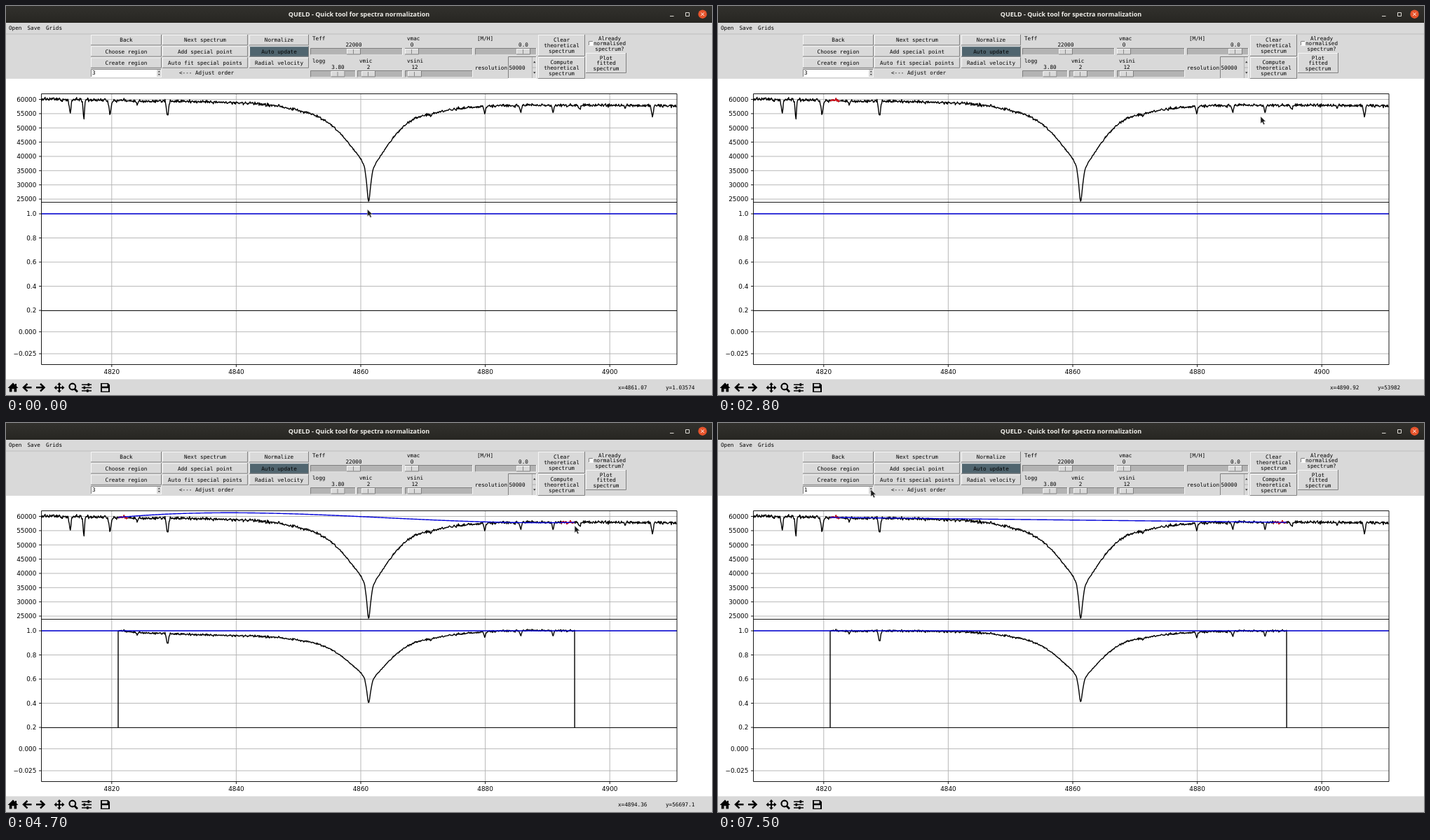
An HTML page for the animation above (8 s loop, 1007 by 556 pixels).

```html
<!DOCTYPE html>
<html lang="en">
<head>
<meta charset="utf-8">
<title>Spectra normalization</title>
<style>
html, body { margin: 0; width: 100%; height: 100%; overflow: hidden; background: #fff; }
svg { display: block; width: 1007px; height: 556px; }
text { white-space: pre; }
.ui { font: 7.65px "DejaVu Sans Mono", monospace; fill: #000; }
.tick { font: 8.85px "DejaVu Sans", sans-serif; fill: #000; }
.title { font: bold 9px "Open Sans", sans-serif; fill: #f0efea; }
.line { fill: none; stroke-width: 1.4; stroke-linejoin: round; }
</style>
</head>
<body>
<svg id="stage" viewBox="0 0 1007 556">
  <defs>
    <linearGradient id="bar" x2="0" y2="1">
      <stop stop-color="#32312d"/><stop offset="1" stop-color="#272622"/>
    </linearGradient>
    <clipPath id="topClip"><path d="M50.5 125.5H957V280.5H50.5Z"/></clipPath>
    <clipPath id="midClip"><path d="M50.5 280.5H957V435.5H50.5Z"/></clipPath>
  </defs>
  <rect width="1007" height="556" fill="#fff"/>
  <g id="window"></g>
  <g id="grid"></g>
  <g id="plots"></g>
  <g id="frame"></g>
  <g id="icons" fill="#000" stroke="none">
    <path d="M10 538.5L2.5 546H4.8V551.5H8.5V547.3H11.5V551.5H15.2V546H17.5L15 543.5V540H13V541.5Z"/>
    <path d="M36.5 545.3H25.5M30.5 540L25 545.3L30.5 550.6M43 545.3H54M49 540L54.5 545.3L49 550.6" fill="none" stroke="#000" stroke-width="2.5"/>
    <path d="M76 538L79 541.4H77V544.4H80V542.3L83.5 545.4L80 548.5V546.4H77V549.4H79L76 552.8L73 549.4H75V546.4H72V548.5L68.5 545.4L72 542.3V544.4H75V541.4H73Z"/>
    <path d="M98 547.5L102 551.5" stroke="#000" stroke-width="2.8"/>
    <circle cx="94.8" cy="544" r="4.4" fill="none" stroke="#000" stroke-width="2.1"/>
    <path d="M108 541.2H122M108 545.6H122M108 550H122" stroke="#000" stroke-width="1.5"/>
    <path d="M116.5 539.2h2.6v4h-2.6zM110.5 543.6h2.6v4h-2.6zM115 548h2.6v4h-2.6z"/>
    <path d="M135 539H145.5L148 541.5V552H135ZM137 540.3V543.8H144.5V540.3ZM137 546.3V550.8H146V546.3Z" fill-rule="evenodd"/>
  </g>
  <path id="cursor" d="M0 0V9.8L2.3 7.7L4.1 11.5L5.8 10.7L4.1 7H7.2Z" fill="#1c1c1c" stroke="#d0d0d0" stroke-width=".5"/>
</svg>
<script>
const LOOP = 8000, LEFT = 50.5, RIGHT = 957;
const $ = id => document.getElementById(id);

function el(parent, tag, attrs, text) {
  const node = document.createElementNS('http://www.w3.org/2000/svg', tag);
  for (const key in attrs) node.setAttribute(key, attrs[key]);
  if (text !== undefined) node.textContent = text;
  parent.appendChild(node);
  return node;
}
const rect = (p, x, y, w, h, fill) => el(p, 'rect', { x, y, width: w, height: h, fill });
const path = (p, d, attrs) => el(p, 'path', { d, fill: 'none', ...attrs });
const label = (p, x, y, text, anchor = 'start', cls = 'ui', dy = 2.7) =>
  el(p, 'text', { x, y: y + dy, 'text-anchor': anchor, class: cls }, text);

// Data to pixels and back
const waveX = w => 506 + (w - 4860) * 8.88;
const fluxY = f => 133.5 + (60000 - f) * 20.36 / 5000;
const normY = n => 297 + (1 - n) * 172.6;
const xWave = x => 4860 + (x - 506) / 8.88;
const yFlux = y => 60000 - (y - 133.5) * 5000 / 20.36;
const yNorm = y => 1 - (y - 297) / 172.6;
const yRest = y => (465.7 - y) * .025 / 31.3;

// ---- window chrome ----
const ui = $('window');
rect(ui, 0, 0, 1007, 24, 'url(#bar)');
label(ui, 503.5, 12, 'QUELD - Quick tool for spectra normalization', 'middle', 'title', 3.2);
path(ui, 'M947 14.5H952.5M969.5 9.5H974.5V14.5H969.5Z', { stroke: '#dedcd6' });
el(ui, 'circle', { cx: 993.5, cy: 11.7, r: 6.2, fill: '#e7542c' });
path(ui, 'M991.3 9.5L995.7 13.9M995.7 9.5L991.3 13.9', { stroke: '#fff' });
rect(ui, 0, 24, 1007, 80, '#d9d9d9');
rect(ui, 0, 39.5, 1007, 1, '#bdbdbd');
rect(ui, 0, 533.5, 1007, 22.5, '#d9d9d9');
label(ui, 4, 31.5, 'Open');
label(ui, 30.5, 31.5, 'Save');
label(ui, 57, 31.5, 'Grids');

function bevel(x, y, w, h, fill, raised = true) {
  rect(ui, x, y, w, h, fill);
  const [a, b] = raised ? ['#f6f6f6', '#808080'] : ['#808080', '#f6f6f6'];
  path(ui, `M${x + .5} ${y + h}V${y + .5}H${x + w}`, { stroke: a });
  path(ui, `M${x} ${y + h - .5}H${x + w - .5}V${y}`, { stroke: b });
}
function button(x, y, w, h, text, fill = '#d9d9d9', gap = 8) {
  bevel(x, y, w, h, fill);
  const lines = text.split('|');
  lines.forEach((s, i) =>
    label(ui, x + w / 2, y + h / 2 + (i - (lines.length - 1) / 2) * gap, s, 'middle'));
}
[[121, 101, 'Back', 'Choose region', 'Create region'],
 [223, 122, 'Next spectrum', 'Add special point', 'Auto fit special points'],
 [347, 85, 'Normalize', 'Auto update', 'Radial velocity']].forEach(([x, w, ...names]) =>
  names.forEach((s, i) =>
    button(x, 41 + i * 16.2, w, 15.4, s, s === 'Auto update' ? '#50656f' : '#d9d9d9')));
button(759, 41, 67, 31, 'Clear|theoretical|spectrum');
button(759, 73, 67, 31, 'Compute|theoretical|spectrum');
button(827, 67, 58, 29, 'Plot|fitted|spectrum', '#d9d9d9', 7.3);
['Already', 'normalised', 'spectrum?'].forEach((s, i) => label(ui, 861, 46 + i * 7.4, s, 'middle'));
bevel(831, 50, 7, 7, '#fff', false);

const arrows = (x, up, down, s) => path(ui,
  `M${x - s} ${up + s}h${2 * s}l${-s} ${-1.4 * s}ZM${x - s} ${down - s}h${2 * s}l${-s} ${1.4 * s}Z`, { fill: '#333' });
bevel(121, 90, 101, 12, '#fff', false);
rect(ui, 215, 91, 6, 10, '#d9d9d9');
arrows(218.3, 93, 98.5, 1.4);
const order = label(ui, 123, 95.3, '3');
label(ui, 247, 95, '<--- Adjust order');

function slider(name, nameX, value, x, y, w, knob) {
  label(ui, nameX, y - 14, name);
  label(ui, knob, y - 5, value, 'middle');
  bevel(x, y, w, 10.5, '#b3b3b3', false);
  bevel(knob - 10, y + 1, 20, 8.5, '#d9d9d9');
  path(ui, `M${knob - .5} ${y + 2}v6.5`, { stroke: '#888' });
}
slider('Teff', 437, '22000', 434, 60, 132, 496);
slider('vmac', 572, '0', 569, 60, 97, 579);
slider('[M/H]', 672, '0.0', 669, 60, 88, 738);
slider('logg', 437, '3.80', 434, 92, 65, 473.5);
slider('vmic', 504, '2', 501, 92, 65, 517);
slider('vsini', 572, '12', 569, 92, 97, 583);
label(ui, 669, 88, 'resolution');
bevel(716, 72, 41, 32, '#d9d9d9', false);
label(ui, 717.5, 88, '50000');
path(ui, 'M750.5 73V103M750.5 88H756', { stroke: '#b0b0b0' });
arrows(753.8, 79.5, 96, 1.7);

// ---- axes ----
const grid = $('grid'), frame = $('frame');
let gridD = '', tickD = '';
for (let w = 4820; w <= 4900; w += 20) {
  const x = waveX(w);
  gridD += `M${x} 125.5V512.5`;
  tickD += `M${x} 512.5v3.5`;
  label(frame, x, 523, w, 'middle', 'tick', 3.2);
}
function yTick(y, text) {
  gridD += `M${LEFT} ${y}H${RIGHT}`;
  tickD += `M${LEFT} ${y}h-3.5`;
  label(frame, 43.3, y, text, 'end', 'tick', 3.3);
}
for (let f = 25000; f <= 60000; f += 5000) yTick(fluxY(f), f);
for (let i = 1; i <= 5; i++) yTick(normY(i / 5), (i / 5).toFixed(1));
yTick(465.7, '0.000');
yTick(497, '\u22120.025');
path(grid, gridD, { stroke: '#b0b0b0', 'stroke-width': .9 });
path(frame, tickD + `M${LEFT} 125.5H${RIGHT}V512.5H${LEFT}ZM${LEFT} 280.5H${RIGHT}M${LEFT} 435.5H${RIGHT}`,
  { stroke: '#000', 'stroke-width': .9 });

// ---- spectrum ----
const shape = [[50, 133.2], [160, 135], [230, 136], [290, 137.2], [340, 139], [380, 142], [405, 146.5],
  [425, 151], [443, 157.5], [460, 167], [475, 180], [490, 198], [504, 216], [511, 229], [514, 250],
  [517.3, 279.5], [520, 258], [523, 236], [528, 224], [540, 206], [552, 189], [565, 174], [580, 163],
  [600, 155], [625, 150], [655, 145.5], [690, 143], [750, 142], [860, 142], [960, 143]];
const dips = [[91.5, 17, 1.3], [111, 27, 1], [148.5, 20, 1.5], [187, 6, 1], [230.5, 21, 1.4], [606, 4, 1.5],
  [683, 12, 1], [734, 10, 1], [780.5, 10, 1.1], [818, 6, 1.2], [883, 5, 1], [922, 16, 1.2]];

// Monotone cubic through the shape points
const secant = shape.slice(1).map((p, i) => (p[1] - shape[i][1]) / (p[0] - shape[i][0]));
const slope = shape.map((_, i) => {
  const a = secant[i - 1], b = secant[i];
  if (a === undefined || b === undefined) return a ?? b;
  return a * b <= 0 ? 0 : 2 * a * b / (a + b);
});
function smooth(x) {
  let i = 0;
  while (i < shape.length - 2 && x > shape[i + 1][0]) i++;
  const [x0, y0] = shape[i], [x1, y1] = shape[i + 1], h = x1 - x0, u = (x - x0) / h, v = 1 - u;
  return y0 * v * v * (1 + 2 * u) + y1 * u * u * (3 - 2 * u) + h * u * v * (slope[i] * v - slope[i + 1] * u);
}
let seed = 4861;
const random = () => (seed = seed * 16807 % 2147483647) / 2147483647;
const noise = () => random() + random() + random() + random() - 2;

const points = [];
for (let x = LEFT; x <= RIGHT; x += .75) {
  let y = smooth(x);
  const level = yFlux(y) / 60000;
  for (const [c, d, s] of dips) y += d * Math.exp(-((x - c) ** 2) / (2 * s * s));
  points.push([x, y + noise() * 2 * level * level * (x < 160 ? 1.15 : 1)]);
}
const trace = list => list.map(([x, y], i) => (i ? 'L' : 'M') + x.toFixed(2) + ' ' + y.toFixed(2)).join('');
const between = (a, b) => points.filter(([x]) => x >= a && x <= b);

// ---- regions and fits ----
const regions = [
  { from: 160, to: waveX(4822.57), press: 1100, release: 2200 },
  { from: 792, to: waveX(4894.36), press: 3400, release: 4700 }
];
const start = regions[0].from, end = regions[1].to;
const bend = { 1: () => 0, 2: () => -6, 3: u => 89.6 * u - 67.5 };
function fitY(n, x) {
  const u = (x - start) / (end - start);
  return 135 + 7 * u + u * (1 - u) * bend[n](u);
}
const plots = $('plots');
const top_ = el(plots, 'g', { 'clip-path': 'url(#topClip)' });
const mid = el(plots, 'g', { 'clip-path': 'url(#midClip)' });
const line = (parent, d, stroke) => path(parent, d, { class: 'line', stroke });

line(top_, trace(points), '#000');
for (const r of regions) r.mark = line(top_, trace(between(r.from, r.to)), '#e00010');
const fits = [1, 2, 3].map(n => {
  const inside = between(start, end);
  const ratio = inside.map(([x, y]) => [x, normY(yFlux(y) / yFlux(fitY(n, x)))]);
  return [
    line(top_, trace(inside.map(([x]) => [x, fitY(n, x)])), '#0000d8'),
    line(mid, trace([[start, 440], ...ratio, [end, 440]]), '#000')
  ];
});
line(mid, `M${LEFT} 297H${RIGHT}`, '#0000d8');
const span = rect(top_, 0, 125.5, 0, 155, '#ee001a');
span.setAttribute('opacity', .56);

// ---- pointer ----
const selY1 = fluxY(59092.9), selY2 = fluxY(56697.1);
const home = [waveX(4861.07), normY(1.03574)];
const route = [
  [0, ...home], [150, ...home], [300, 480, 270], [500, 345, 205], [700, 215, 152], [850, 154, 138],
  [1000, 157, 136], [1100, 160, selY1], [1300, 167, selY1], [1450, 167, selY1], [1500, 171, selY1],
  [1750, 171, selY1], [1800, 172.5, selY1], [1900, regions[0].to, selY1], [2150, regions[0].to, selY1],
  [2300, 230, 141], [2500, 470, 152], [2700, 715, 158], [2800, 774, fluxY(53982)],
  [2850, waveX(4890.92), fluxY(53982)], [3000, 791, 152], [3400, 792, 148], [3700, 798, selY2],
  [3900, 804, selY2], [4000, waveX(4894), selY2], [4050, waveX(4894), selY2],
  [4400, end, selY2], [5450, end, selY2], [5600, 590, 136], [5700, 370, 114], [5800, 253.5, 103.5],
  [5950, 253.5, 103.5], [6000, 231.5, 97.5], [6150, 231.5, 97.5], [6300, 223.2, 95.8],
  [6450, 223.2, 95.8], [6500, 218, 95.3], [LOOP, 218, 95.3]
];
function pointer(t) {
  let i = 0;
  while (i < route.length - 2 && t >= route[i + 1][0]) i++;
  const [t0, x0, y0] = route[i], [t1, x1, y1] = route[i + 1];
  const u = Math.min(1, (t - t0) / (t1 - t0));
  return [x0 + (x1 - x0) * u, y0 + (y1 - y0) * u];
}
const readX = label(ui, 873, 545, ''), readY = label(ui, 941, 545, '');
const show = (node, on) => { node.style.display = on ? '' : 'none'; };

function draw(time) {
  const t = Math.floor(time / 100) * 100;
  const [x, y] = pointer(t);
  $('cursor').setAttribute('transform', `translate(${x} ${y})`);

  const [rx, ry] = pointer(Math.min(t + 50, LOOP));
  const inside = ry > 125.5 && rx > LEFT;
  const value = ry < 280.5 ? yFlux(ry) : ry < 435.5 ? yNorm(ry) : yRest(ry);
  readX.textContent = inside ? 'x=' + +xWave(rx).toPrecision(6) : '';
  readY.textContent = inside ? 'y=' + +value.toPrecision(6) : '';

  const active = regions.find(r => t >= r.press && t < r.release);
  show(span, active);
  if (active) {
    span.setAttribute('x', active.from);
    span.setAttribute('width', Math.max(0, x - active.from));
  }
  for (const r of regions) show(r.mark, t >= r.release);

  const n = t < 6600 ? 3 : t < 7500 ? 2 : 1;
  order.textContent = n;
  fits.forEach((pair, i) => pair.forEach(p => show(p, t >= 4700 && i + 1 === n)));
}
const began = performance.now();
function tick() {
  draw((performance.now() - began) % LOOP);
  requestAnimationFrame(tick);
}
tick();
</script>
</body>
</html>
```
